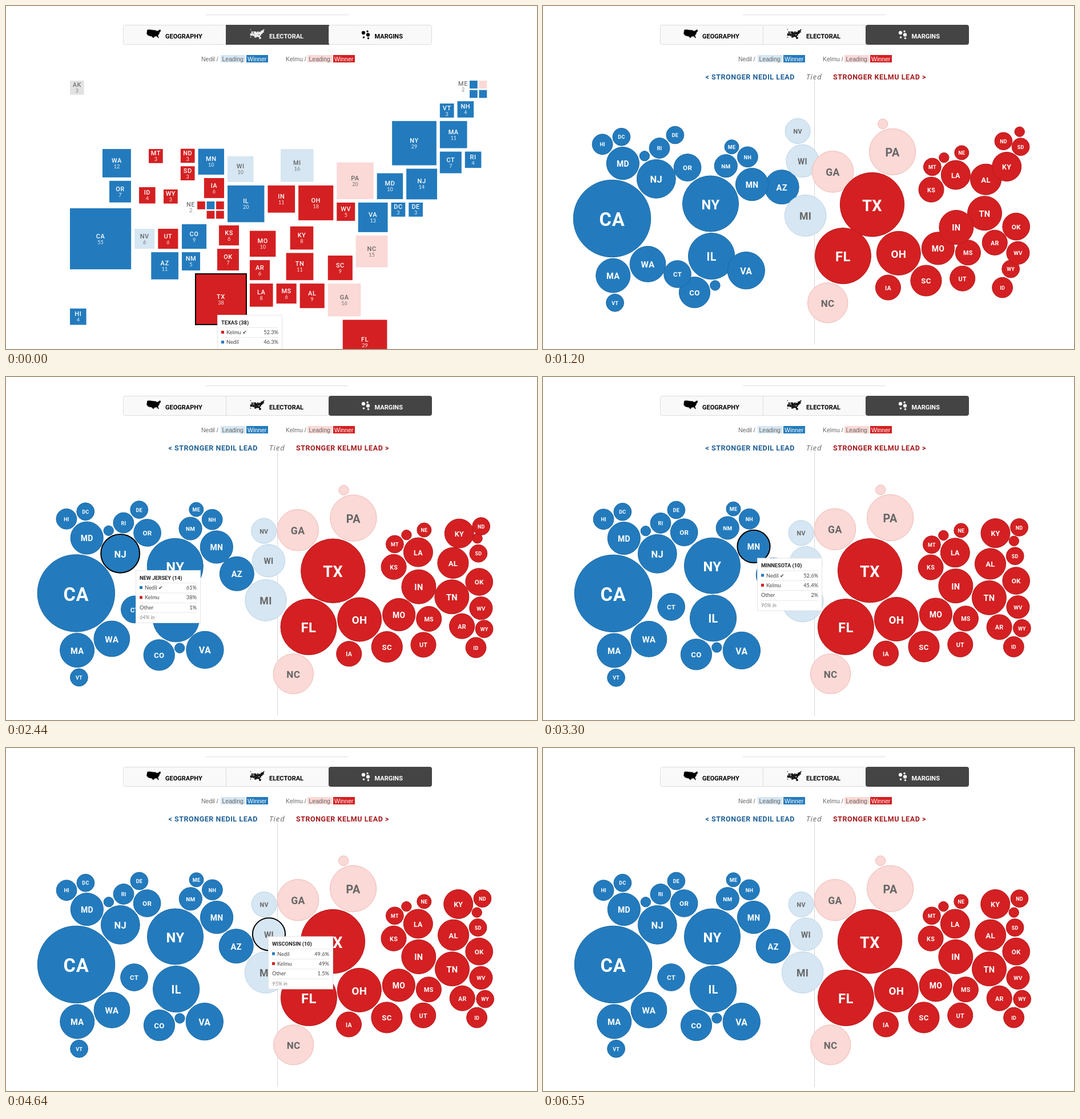
An HTML page for the animation above (9.04 s loop, 930x602 px).

```html
<!DOCTYPE html>
<html lang="en">
<head>
<meta charset="utf-8">
<title>Electoral margins</title>
<style>
  html, body { margin: 0; width: 100%; height: 100%; overflow: hidden; background: #fff; }
  svg { display: block; }
  text { font-family: Roboto, sans-serif; }
  .tab rect { fill: #f9f9f9; stroke: #ddd; }
  .tab { color: #000; }
  .tab.hover rect { fill: #e8e8e8; }
  .tab.active rect { fill: #444; stroke: #444; }
  .tab.active { color: #fff; }
  .tab text { font-size: 11px; font-weight: 700; fill: currentColor; }
  .tab .icon, .tab .icon rect { fill: currentColor; stroke: currentColor; }
  .icon { stroke-width: .4; }
  .legend text { font: 10.5px "Liberation Sans", Arial, sans-serif; fill: #666; }
  .lead { font-size: 12.5px; font-weight: 700; letter-spacing: .55px; }
  .tied { font: italic 13px "Open Sans", sans-serif; letter-spacing: 1px; fill: #666; }
  .tile { font-size: 11px; font-weight: 500; letter-spacing: .5px; text-anchor: middle; }
  .votes { font: 9px Lato, sans-serif; text-anchor: middle; opacity: .9; }
  .bubble text { font-weight: 600; letter-spacing: .02em; text-anchor: middle; }
  .tip text { font: 9.3px Lato, sans-serif; fill: #444; }
  .tip .title { font: 700 9.25px Roboto, sans-serif; fill: #222; }
  .tip .note { font-style: italic; fill: #888; }
  .tip .value { text-anchor: end; }
  .tip .check { font: bold 9px "DejaVu Sans", sans-serif; }
</style>
</head>
<body>
<svg width="930" height="602" viewBox="0 0 930 602">
  <path d="M350 15.5H600" stroke="#ddd"/>
  <g class="tab">
    <rect x="205.5" y="33.5" width="180" height="34" rx="3"/>
    <path class="icon" d="M247.5 42l3-.5 9 1 3 .2 1.5 1.5 2-.4 3-2 1.5 0 .3 2.5-2 2-.3 2-2.5 3.500 1.500 4-1 .3-2-3-4 .2-2 2.500-1 0-2-2.500-3-.6-3.500-1-2.500-3z"/>
    <text x="279" y="56.5">GEOGRAPHY</text>
  </g>
  <g class="tab" id="electoral">
    <rect x="385.5" y="33.5" width="180" height="34"/>
    <g class="icon" id="miniature" transform="translate(428 41) scale(.033) translate(-112 -131)" style="stroke-width:14"></g>
    <text x="461" y="56.5">ELECTORAL</text>
  </g>
  <g class="tab" id="margins">
    <rect x="565.5" y="33.5" width="180" height="34" rx="3"/>
    <g class="icon">
      <circle cx="626" cy="47" r="3"/><circle cx="633" cy="44.5" r="1.5"/>
      <circle cx="634" cy="50.5" r="3"/><circle cx="626.5" cy="55" r="1.5"/>
      <circle cx="634.5" cy="56.5" r="1.5"/>
    </g>
    <text x="645.5" y="56.5">MARGINS</text>
  </g>
  <g class="legend" id="legend"></g>
  <g id="tileScene"></g>
  <g id="bubbleScene">
    <text class="lead" x="284.5" y="128.5" fill="#1f6096">&lt; STRONGER NEDIL LEAD</text>
    <text class="tied" x="461" y="128.5">Tied</text>
    <text class="lead" x="508" y="128.5" fill="#a3191c">STRONGER KELMU LEAD &gt;</text>
    <path d="M475.5 133V595" stroke="#aaa" stroke-dasharray="1.5 1.5"/>
  </g>
</svg>
<script>
const LOOP = 9040, HOVER_TAB = 720, SWITCH = 1110;
const STEP = 95, SETTLE = 490;
const TILE_GAP = 6, BUBBLE_GAP = 1.4;

const blue = { fill: '#237bbd', edge: '#1c69a4', ink: '#fff' };
const red = { fill: '#d42022', edge: '#b3191c', ink: '#fff' };
const paleBlue = { fill: '#d6e6f2', edge: '#b9d4e7', ink: '#666' };
const paleRed = { fill: '#fad9d6', edge: '#f0b9b4', ink: '#666' };
const grey = { fill: '#e2e2e2', ink: '#777' };

const $ = id => document.getElementById(id);
const tileScene = $('tileScene'), bubbleScene = $('bubbleScene');

function add(parent, tag, attrs, text) {
  const node = document.createElementNS('http://www.w3.org/2000/svg', tag);
  for (const key in attrs) node.setAttribute(key, attrs[key]);
  if (text) node.textContent = text;
  return parent.appendChild(node);
}

function legend(x, boxX, name, pale, full) {
  const g = $('legend');
  add(g, 'text', { x, y: 96.5 }, name + ' /');
  add(g, 'rect', { x: boxX, y: 86, width: 43, height: 13, fill: pale.fill });
  add(g, 'text', { x: boxX + 2.5, y: 96.5 }, 'Leading');
  add(g, 'rect', { x: boxX + 45, y: 86, width: 38, height: 13, fill: full.fill });
  add(g, 'text', { x: boxX + 47, y: 96.5, style: 'fill:#fff' }, 'Winner');
}
legend(342, 376, 'Nedil', paleBlue, blue);
legend(490, 528, 'Kelmu', paleRed, red);

// Tile area and bubble area are both proportional to electoral votes.
const states = {};
function define(kind, votes) {
  for (const name in votes) {
    const root = Math.sqrt(votes[name]);
    states[name] = { name, kind, votes: votes[name], side: 14.5 * root - .4, r: 9.2 * root };
  }
}
define(grey, { AK: 3 });
define(blue, { WA: 12, OR: 7, CA: 55, HI: 4, AZ: 11, CO: 9, NM: 5, MN: 10, IL: 20, NY: 29, VT: 3, NH: 4,
  MA: 11, CT: 7, RI: 4, NJ: 14, DE: 3, MD: 10, DC: 3, VA: 13, ME: 2, ME1: 1, NE2: 1 });
define(paleBlue, { NV: 6, WI: 10, MI: 16 });
define(paleRed, { PA: 20, GA: 16, NC: 15, ME2: 1 });
define(red, { MT: 3, ID: 4, WY: 3, ND: 3, SD: 3, UT: 6, KS: 6, OK: 7, TX: 38, IA: 6, MO: 10, AR: 6, LA: 8,
  MS: 6, AL: 9, TN: 11, KY: 8, IN: 11, OH: 18, WV: 5, SC: 9, FL: 29, NE: 2, NE1: 1, NE3: 1 });

const pin = (name, x, y) => Object.assign(states[name], { x, y });

// A run of tiles, each one gap away from the one before it.
function run(side, from, shift, ...names) {
  for (const name of names) {
    const a = states[from], b = states[name];
    const after = a.side + TILE_GAP, before = -b.side - TILE_GAP;
    b.x = a.x + ({ right: after, left: before }[side] ?? shift);
    b.y = a.y + ({ below: after, above: before }[side] ?? shift);
    from = name;
    shift = 0;
  }
}
pin('AK', 112, 131);
pin('HI', 112, 531);
pin('MT', 250, 251);
pin('ID', 233, 318);
pin('WY', 276, 322);
pin('MI', 481, 251);
pin('WA', 169, 251);
run('below', 'WA', 12, 'OR');
pin('CA', 112, 355);
run('right', 'CA', 36, 'NV', 'UT');
run('below', 'UT', -12, 'AZ');
run('right', 'AZ', 0, 'NM');
run('above', 'NM', 0, 'CO');
run('below', 'NM', 24, 'TX');
run('above', 'TX', 38, 'OK');
run('above', 'OK', 3, 'KS');
run('right', 'TX', 17, 'LA', 'MS', 'AL', 'GA');
run('above', 'LA', 0, 'AR', 'MO');
run('above', 'AL', -24, 'TN');
run('above', 'TN', 7, 'KY');
run('above', 'GA', 0, 'SC');
run('below', 'GA', 26, 'FL');
pin('IL', 388, 315);
run('left', 'IL', -13, 'IA');
run('above', 'IL', 0, 'WI');
run('left', 'WI', -13, 'MN', 'ND');
run('below', 'ND', 0, 'SD');
run('right', 'IL', 0, 'IN', 'OH');
run('right', 'OH', 30, 'WV');
run('above', 'WV', 0, 'PA');
run('right', 'PA', 19, 'MD');
run('right', 'MD', -8, 'NJ');
run('above', 'NJ', -25, 'NY');
run('right', 'NY', 0, 'MA');
run('above', 'MA', 0, 'VT');
run('right', 'VT', -4, 'NH');
run('below', 'MA', 0, 'CT');
run('right', 'CT', 0, 'RI');
run('below', 'MD', -33, 'VA');
run('right', 'VA', 0, 'DC', 'DE');
run('below', 'VA', -4, 'NC');

// Where a bubble starts relative to its rest; others move with the bubble they lean on.
const drift = {
  CA: [-2, -7], OR: [6, 11], CT: [11, 68], NY: [-3, 16], VA: [8, -16], AZ: [15, -30], WI: [-6, -55],
  MI: [5, -26], TX: [4, 9], GA: [-4, 24], FL: [-5, 0], IN: [1, 22], LA: [1, -12], TN: [-8, -24],
  KY: [20, 8], ND: [-28, -27], SD: [10, -68], OK: [0, 30], WY: [-20, 21],
};
const rest = (name, cx, cy) => Object.assign(states[name], { cx, cy, drift: drift[name] });

// Bubbles that touch another one at the given angles, in degrees.
function lean(from, angles) {
  const a = states[from];
  for (const name in angles) {
    const b = states[name], angle = angles[name] * Math.PI / 180;
    const reach = a.r + b.r + BUBBLE_GAP;
    b.cx = a.cx + reach * Math.cos(angle);
    b.cy = a.cy + reach * Math.sin(angle);
    b.drift = drift[name] || a.drift;
  }
}
rest('CA', 123, 380);
lean('CA', { MD: -79, NJ: -42, WA: 52, MA: 89 });
lean('MD', { HI: -137, DC: -93 });
lean('NJ', { OR: -39, RI: -84, ME1: -117 });
lean('RI', { DE: -40 });
lean('MA', { VT: 86 });
rest('CT', 224.5, 402.5);
rest('NY', 296.5, 331);
lean('NY', { IL: 89, NM: -68, MN: -25 });
lean('IL', { CO: 115, VA: 49, NE2: 83 });
lean('NM', { ME: -73 });
lean('MN', { NH: -99, AZ: 56 });
lean('AZ', { WI: -20 });
lean('WI', { NV: -99, MI: 95 });
rest('TX', 572.5, 339.5);
lean('TX', { GA: -130, PA: -69, FL: 113, OH: 61.5 });
lean('PA', { ME2: -109 });
lean('FL', { NC: 108 });
lean('OH', { IA: 107, MO: -7, SC: 45 });
lean('MO', { IN: -55, MS: 8 });
lean('MS', { UT: 102 });
lean('IN', { LA: -91, TN: 20 });
lean('LA', { KS: 149, MT: -161, NE1: -124, NE: -75 });
lean('TN', { AL: -88, OK: -33, AR: 71 });
lean('AL', { KY: -81, SD: -17 });
lean('KY', { ND: -13 });
lean('SD', { NE3: -94 });
lean('OK', { WV: 86 });
lean('WV', { WY: 79 });
lean('WY', { ID: 114 });

function drawTile(kind, x, y, side) {
  const box = { x, y, width: side, height: side };
  add($('miniature'), 'rect', box);
  return add(tileScene, 'rect', { ...box, fill: kind.fill });
}

function tileLabel(name, votes, x, y, fill) {
  add(tileScene, 'text', { class: 'tile', x, y: y - 1, fill }, name);
  add(tileScene, 'text', { class: 'votes', x, y: y + 9, fill }, String(votes));
}

// Maine and Nebraska split their votes by district.
function districts(name, x, y, columns, kinds) {
  tileLabel(name, 2, x - 11.5, y + 10, '#777');
  kinds.forEach((kind, i) => {
    if (kind) drawTile(kind, x + 16.5 * (i % columns), y + 16.5 * Math.floor(i / columns), 13.8);
  });
}
districts('ME', 812, 131, 2, [blue, paleRed, blue, blue]);
districts('NE', 335, 343, 3, [red, blue, red, null, red, red]);

for (const s of Object.values(states)) {
  if (s.x) {
    s.tile = drawTile(s.kind, s.x, s.y, s.side);
    tileLabel(s.name, s.votes, s.x + s.side / 2, s.y + s.side / 2, s.kind.ink);
  }
  if (s.cx) {
    const size = Math.max(9, .48 * s.r);
    s.bubble = add(bubbleScene, 'g', { class: 'bubble' });
    s.circle = add(s.bubble, 'circle', { r: s.r - .5, fill: s.kind.fill });
    if (s.votes > 1) add(s.bubble, 'text', { y: .41 * size, 'font-size': size, fill: s.kind.ink }, s.name);
  }
}

function tooltip(scene, x, y, title, rows, note) {
  const g = add(scene, 'g', { class: 'tip', transform: `translate(${x} ${y})` });
  add(g, 'rect', { x: .5, y: .5, width: 113, height: 92, fill: '#fff', stroke: '#e4e4e4' });
  add(g, 'text', { class: 'title', x: 7, y: 16.5 }, title);
  rows.forEach(([label, value, kind, won], i) => {
    const base = 34 + 17.4 * i;
    add(g, 'path', { d: `M7 ${base - 11.5}H107`, stroke: '#e8e8e8' });
    if (kind) add(g, 'rect', { x: 7, y: base - 6, width: 5, height: 5, fill: kind.fill });
    const text = add(g, 'text', { x: kind ? 16 : 7, y: base }, label + ' ');
    if (won) add(text, 'tspan', { class: 'check' }, '✔');
    add(g, 'text', { class: 'value', x: 107, y: base }, value);
  });
  add(g, 'path', { d: 'M7 74.7H107', stroke: '#e8e8e8' });
  add(g, 'text', { class: 'note', x: 7, y: 86 }, note);
  return g;
}

states.TX.tile.setAttribute('stroke', '#000');
states.TX.tile.setAttribute('stroke-width', 2);
tooltip(tileScene, 370, 542, 'TEXAS (38)',
  [['Kelmu', '52.3%', red, true], ['Nedil', '46.3%', blue]], '');

const hovers = [
  { name: 'NJ', from: 2165, to: 2830, tip: tooltip(bubbleScene, 227, 339, 'NEW JERSEY (14)',
    [['Nedil', '61%', blue, true], ['Kelmu', '38%', red], ['Other', '1%']], '64% in') },
  { name: 'MN', from: 3015, to: 3880, tip: tooltip(bubbleScene, 375, 317.5, 'MINNESOTA (10)',
    [['Nedil', '52.6%', blue, true], ['Kelmu', '45.4%', red], ['Other', '2%']], '90% in') },
  { name: 'WI', from: 4350, to: 5780, tip: tooltip(bubbleScene, 459, 330.5, 'WISCONSIN (10)',
    [['Nedil', '49.6%', blue], ['Kelmu', '49%', red], ['Other', '1.5%']], '95% in') },
];

const bubbles = Object.values(states).filter(s => s.bubble);
const show = (node, on) => { node.style.display = on ? '' : 'none'; };

function draw(t) {
  const inMargins = t >= SWITCH;
  show(tileScene, !inMargins);
  show(bubbleScene, inMargins);
  $('electoral').classList.toggle('active', !inMargins);
  $('margins').classList.toggle('hover', t >= HOVER_TAB && !inMargins);
  $('margins').classList.toggle('active', inMargins);
  if (!inMargins) return;

  const step = Math.floor((t - SWITCH + 5) / STEP) - 1;
  const pull = Math.exp(-step * STEP / SETTLE);
  const hover = hovers.find(h => t >= h.from && t < h.to);
  for (const h of hovers) show(h.tip, h === hover);
  for (const { name, kind, bubble, circle, cx, cy, drift: [dx, dy] } of bubbles) {
    const on = hover && hover.name === name;
    bubble.setAttribute('transform', `translate(${cx + dx * pull} ${cy + dy * pull})`);
    circle.setAttribute('stroke', on ? '#000' : kind.edge);
    circle.setAttribute('stroke-width', on ? 2 : 1);
  }
}

const start = performance.now();
function frame() {
  draw((performance.now() - start) % LOOP);
  requestAnimationFrame(frame);
}
frame();
</script>
</body>
</html>
```
